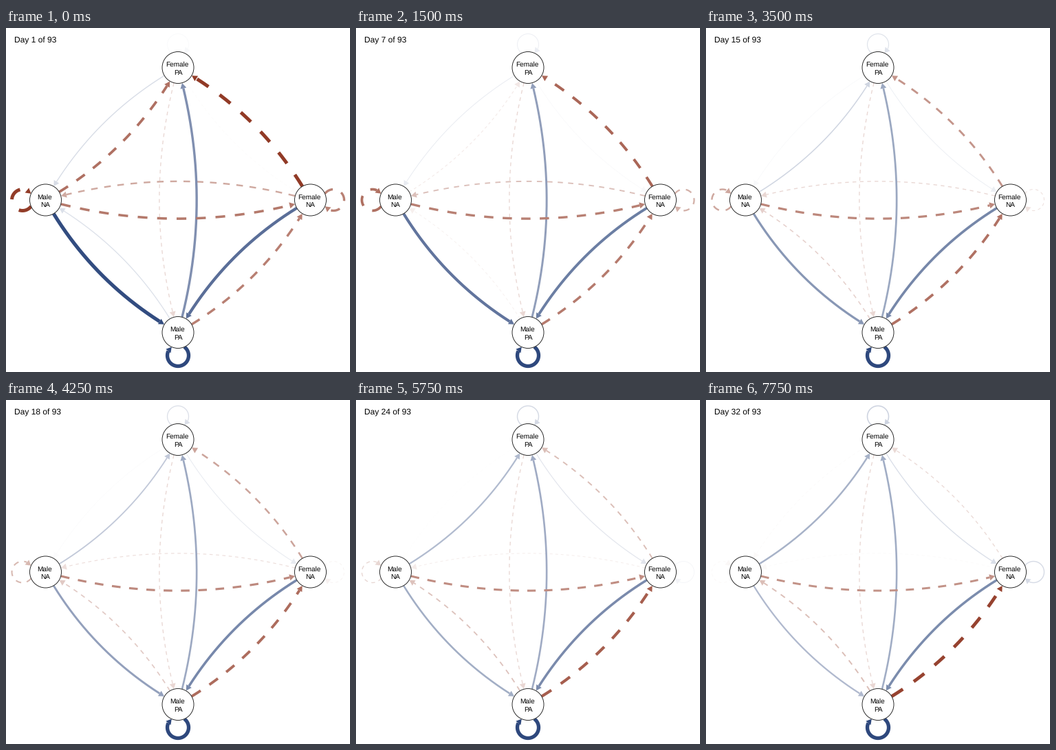
Recreate the animation shown at these times as a matplotlib script. Size 500x500 px, loop 8000 ms.

```python
import numpy as np
import matplotlib.pyplot as plt
from matplotlib.animation import FuncAnimation
from matplotlib.patches import Circle, Polygon

SIZE, DAYS, TOTAL = 500, 32, 93
PX = 0.72                       # points per pixel at 100 dpi
RING, NODE_R = 192.5, 23
LOOP_R, LOOP_GAP = 15.5, 33.5
HEAD_LEN, HEAD_W = 8, 9
BEND = 0.0705                   # bulge as a share of the chord
BLUE = np.array([46, 72, 125]) / 255
RED = np.array([138, 45, 24]) / 255

plt.rcParams["font.family"] = "Liberation Sans"
plt.rcParams["text.hinting"] = "none"

# Clockwise from the top.
NODES = {"FP": "Female PA", "FN": "Female NA", "MP": "Male PA", "MN": "Male NA"}
OUTWARD = {name: np.array([np.sin(a), -np.cos(a)])
           for name, a in zip(NODES, np.arange(4) * np.pi / 2)}
CENTER = {name: SIZE / 2 + RING * out for name, out in OUTWARD.items()}

# How an edge strength travels from its first to its last value.
LATE, STEADY, QUICK, FAST = -2, 1, 2, 3.6

# First strength, last strength, pace; negative means red and dashed.
EDGES = {
    "FP FP": (.04, .24, STEADY),
    "FP MN": (.19, -.03, QUICK),
    "FP FN": (-.02, .18, STEADY),
    "FP MP": (-.19, -.19, STEADY),
    "MN FP": (-.68, .42, FAST),
    "MN MN": (-.93, -.04, STEADY),
    "MN FN": (-.64, -.52, STEADY),
    "MN MP": (.98, .38, QUICK),
    "FN FP": (-.94, -.18, STEADY),
    "FN MN": (-.41, -.03, STEADY),
    "FN FN": (-.60, .20, STEADY),
    "FN MP": (.79, .63, FAST),
    "MP FP": (.61, .45, FAST),
    "MP MN": (.17, -.31, FAST),
    "MP FN": (-.61, -.90, LATE),
    "MP MP": (1, 1, STEADY),
}


def strength(u, first, last, pace):
    """Exponential approach from first (u = 0) to last (u = 1)."""
    return first + (last - first) * np.expm1(-pace * u) / np.expm1(-pace)


def distance(points, p):
    return np.hypot(*(points - p).T)


def edge_path(a, b):
    """Points of an edge from node centre to node centre."""
    u = np.linspace(0, 1, 1200)[:, None]
    p, q = CENTER[a], CENTER[b]
    if a == b:
        out = OUTWARD[a]
        angle = np.arctan2(-out[1], -out[0]) + 2 * np.pi * u
        return p + LOOP_GAP * out + LOOP_R * np.hstack([np.cos(angle), np.sin(angle)])
    dx, dy = q - p
    return p + u * (q - p) + 4 * BEND * u * (1 - u) * np.array([-dy, dx])


def edge_shape(a, b):
    """Visible line of an edge and the corners of its arrowhead."""
    pts = edge_path(a, b)
    pts = pts[(distance(pts, CENTER[a]) >= NODE_R) & (distance(pts, CENTER[b]) >= NODE_R)]
    tip = pts[-1]
    line = pts[distance(pts, tip) >= HEAD_LEN - 0.3]
    base = line[-1]
    d = (tip - base) / np.hypot(*(tip - base))
    side = np.array([-d[1], d[0]]) * HEAD_W / 2
    return line, [tip, base + side, base - side]


fig = plt.figure(figsize=(5, 5), dpi=100, facecolor="white")
ax = fig.add_axes([0, 0, 1, 1])
ax.set_xlim(0, SIZE)
ax.set_ylim(SIZE, 0)
ax.axis("off")

artists = {}
for key in EDGES:
    shape, corners = edge_shape(*key.split())
    line, = ax.plot(*shape.T, solid_capstyle="butt", dash_capstyle="butt")
    head = ax.add_patch(Polygon(corners, closed=True, linewidth=0))
    artists[key] = line, head

for name, label in NODES.items():
    x, y = CENTER[name]
    ax.add_patch(Circle((x, y), NODE_R, facecolor="white", edgecolor="#1a1a1a",
                        linewidth=0.9 * PX, zorder=5))
    top, bottom = label.split()
    for text, tx, ty in ((top, x - 1.4, y - 1.4), (bottom, x, y + 10.2)):
        ax.text(tx, ty, text, fontsize=10 * PX, ha="center", va="baseline", zorder=6)

title = ax.text(12, 22, "", fontsize=12 * PX, va="baseline")


def draw(frame):
    title.set_text(f"Day {frame + 1} of {TOTAL}")
    for key, (line, head) in artists.items():
        w = strength(frame / (DAYS - 1), *EDGES[key])
        s = abs(w)
        color = 1 - s * (1 - (BLUE if w > 0 else RED))
        width = 0.4 + 4.9 * s
        dash = 4 * max(1, 1 / width)
        line.set_linewidth(width * PX)
        line.set_linestyle("-" if w > 0 else (0, (dash, dash)))
        line.set_color(color)
        head.set_facecolor(color)
        line.set_zorder(2 + s)
        head.set_zorder(2 + s)
    return []


anim = FuncAnimation(fig, draw, frames=DAYS, interval=250, repeat=True, repeat_delay=0)
plt.show()
```
